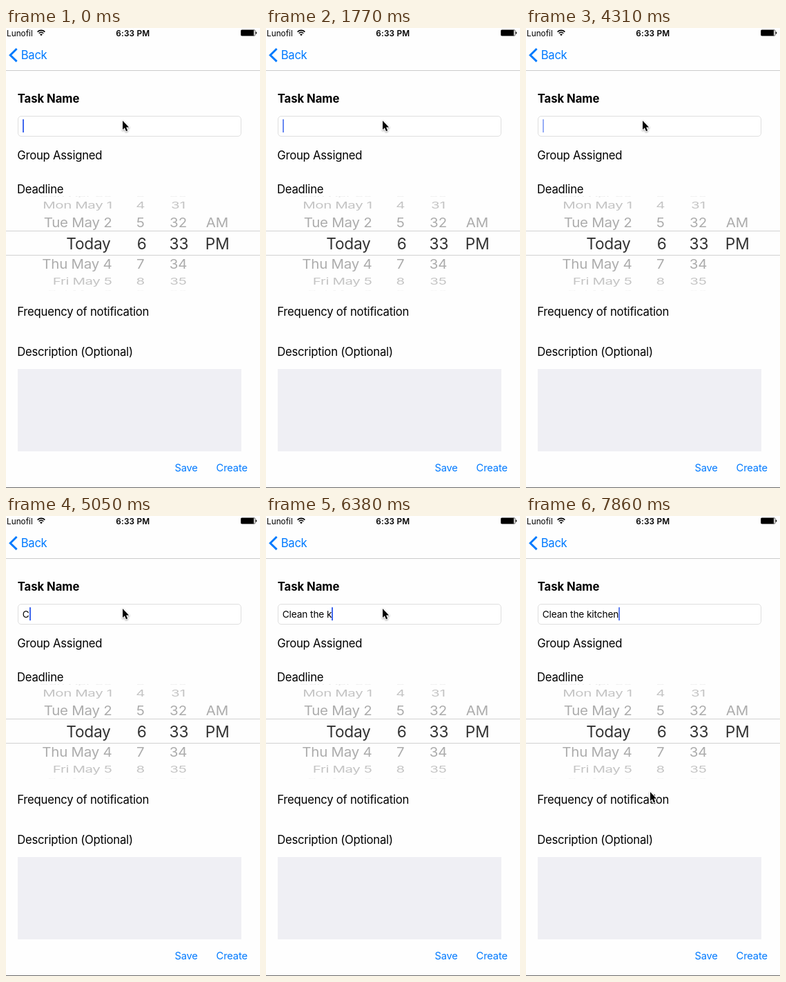
Recreate the animation shown at these times as an HTML page with a canvas. Size 368 by 665 pixels, loop 8000 ms.

```html
<!DOCTYPE html>
<html lang="en">
<head>
<meta charset="utf-8">
<title>New task</title>
<style>
  html, body { margin: 0; width: 100%; height: 100%; overflow: hidden; background: #fefefe; }
  canvas { display: block; width: 368px; height: 665px; }
</style>
</head>
<body>
<canvas id="stage"></canvas>
<script>
const W = 368, H = 665, LOOP = 8000, STEP = 148.2;
const BLUE = '#007aff', CARET = '#4068ee';
const TASK = 'Clean the kitchen';
const canvas = document.getElementById('stage');
const ratio = window.devicePixelRatio || 1;
canvas.width = Math.round(W * ratio);
canvas.height = Math.round(H * ratio);
const ctx = canvas.getContext('2d');

const clamp = v => Math.min(1, Math.max(0, v));
const mix = (a, b, p) => a + (b - a) * p;

// Letters typed at a few steps; the pace between them is even
const pace = [[33, 0], [36, 2.2], [45, 13.2], [46, 13], [50, 17]];

function lettersAt(step) {
  const next = pace.findIndex(([at]) => at > step);
  if (next === 0) return 0;
  if (next < 0) return TASK.length;
  const [from, a] = pace[next - 1], [to, b] = pace[next];
  return Math.round(mix(a, b, (step - from) / (to - from)));
}

// One blink per second, held solid while typing
function caretAlpha(step) {
  const s = step * STEP / 1000;
  const idle = s < 4.97 ? s : Math.max(0, s - 7.6);
  return clamp((Math.abs(idle % 1 - .52) - .14) / .15);
}

// The pointer swings right on its way down
function pointerAt(step) {
  const p = clamp((step - 51) / 2);
  return [mix(169, 180, p) + 52 * Math.sin(Math.PI * p), mix(134, 399, p)];
}

function setFont(size, weight, tracking) {
  ctx.font = `${weight} ${size}px Inter, sans-serif`;
  ctx.letterSpacing = tracking + 'px';
}

function text(str, x, y, { size = 16.7, weight = 400, tracking = -.24, color = '#000',
                           align = 'left', squash = 1 } = {}) {
  ctx.save();
  setFont(size, weight, tracking);
  ctx.fillStyle = color;
  ctx.textAlign = align;
  ctx.translate(x, y);
  ctx.scale(1, squash);
  ctx.fillText(str, 0, 0);
  ctx.restore();
}

function rect(x, y, w, h, color) {
  ctx.fillStyle = color;
  ctx.fillRect(x, y, w, h);
}

function statusBar() {
  text('Lunofil', 1, 11.5, { size: 11.8, tracking: 0 });
  text('6:33 PM', 183.8, 11.5, { size: 11.8, weight: 600, tracking: .2, align: 'center' });

  ctx.strokeStyle = ctx.fillStyle = '#000';
  ctx.lineWidth = 1.6;
  for (const r of [4.6, 7.6]) {
    ctx.beginPath();
    ctx.arc(51, 11, r, -Math.PI * .75, -Math.PI * .25);
    ctx.stroke();
  }
  ctx.beginPath();
  ctx.moveTo(51, 11.3);
  ctx.arc(51, 11.3, 2.7, -Math.PI * .75, -Math.PI * .25);
  ctx.fill();

  ctx.lineWidth = .7;
  ctx.beginPath();
  ctx.roundRect(340.5, 2.8, 20.4, 8.4, 1.4);
  ctx.stroke();
  rect(340.6, 3, 18.4, 8, '#000');
  ctx.beginPath();
  ctx.roundRect(361.8, 5.4, 1.4, 3.2, .7);
  ctx.fill();
}

function navBar() {
  ctx.strokeStyle = BLUE;
  ctx.lineWidth = 2.9;
  ctx.beginPath();
  ctx.moveTo(15.6, 30);
  ctx.lineTo(6.2, 39.2);
  ctx.lineTo(15.6, 48.4);
  ctx.stroke();
  text('Back', 21.7, 45.2, { color: BLUE, tracking: -.3 });
  rect(0, 61, W, 1, '#cbcbcb');
}

function labels() {
  text('Task Name', 16.7, 107.8, { weight: 700, tracking: -.05 });
  text('Group Assigned', 16.2, 189.8);
  text('Deadline', 16, 238.8);
  text('Frequency of notification', 16.2, 415.8);
  text('Description (Optional)', 16.2, 473.8);
  rect(17, 493, 324, 119, '#efeff4');
  text('Save', 244.5, 641, { size: 14.7, color: BLUE });
  text('Create', 304.6, 641, { size: 14.7, color: BLUE, tracking: -.15 });
  rect(0, 664, W, 1, '#6a6a6a');
}

function dayName(offset) {
  if (!offset) return 'Today';
  const parts = { weekday: 'short', month: 'short', day: 'numeric' };
  return new Date(2017, 4, 3 + offset).toLocaleDateString('en-US', parts).replace(',', '');
}

// Rows sit on a cylinder, 25 degrees apart
function pickerRow(i) {
  const angle = i * 25 * Math.PI / 180;
  const squash = Math.cos(angle);
  const size = i ? 20.5 : 22.7;
  const y = 311.3 + 72 * Math.sin(angle) + size * .364 * squash;
  const grey = 255 - 92 * squash;
  const color = i ? `rgb(${grey}, ${grey}, ${grey})` : '#333';
  const style = { size, squash, color, tracking: 0, align: 'center' };
  const lean = i ? 0 : 1;
  text(dayName(i), 153.6 - lean * 2, y,
    { ...style, align: 'right', tracking: -.25 - .15 * (Math.abs(i) > 1) });
  text(6 + i, 194.8 + lean * 2, y, style);
  text(33 + i, 249.6 + lean, y, style);
  if (i === -1) text('AM', 306, y, style);
  if (i === 0) text('PM', 306.3, y, style);
}

function picker() {
  ctx.save();
  ctx.beginPath();
  ctx.rect(0, 243, W, 136.5);
  ctx.clip();
  for (let i = -3; i <= 3; i++) pickerRow(i);
  ctx.restore();
  for (const y of [293, 328]) rect(0, y, W, 1, '#d2d2d2');
}

function field(step) {
  ctx.beginPath();
  ctx.roundRect(17.5, 127.5, 323, 29, 4.5);
  ctx.fillStyle = '#fff';
  ctx.fill();
  ctx.strokeStyle = '#dfdfdf';
  ctx.lineWidth = 1;
  ctx.stroke();

  const size = 13.7, tracking = -.12, left = 23.7;
  const entry = TASK.slice(0, lettersAt(step));
  text(entry, left, 146.8, { size, tracking });
  setFont(size, 400, tracking);
  const end = Math.round(left + ctx.measureText(entry).width);
  ctx.globalAlpha = caretAlpha(step);
  rect(end, 132, 2, 19, CARET);
  ctx.globalAlpha = 1;
}

function arrow([x, y]) {
  ctx.save();
  ctx.translate(x, y);
  ctx.beginPath();
  for (const [px, py] of [[0, 0], [0, 13], [2.9, 10.3], [5, 15.2], [7.2, 14.2], [5.1, 9.4], [9.1, 9.4]])
    ctx.lineTo(px, py);
  ctx.closePath();
  ctx.lineJoin = 'round';
  ctx.lineWidth = 2;
  ctx.strokeStyle = '#fff';
  ctx.shadowColor = 'rgba(0, 0, 0, .4)';
  ctx.shadowBlur = 2.5 * ratio;
  ctx.shadowOffsetY = ratio;
  ctx.stroke();
  ctx.shadowColor = 'transparent';
  ctx.fillStyle = '#000';
  ctx.fill();
  ctx.restore();
}

function draw(now) {
  const step = Math.floor((now % LOOP + 12) / STEP);
  ctx.setTransform(ratio, 0, 0, ratio, 0, 0);
  rect(0, 0, W, H, '#fefefe');
  statusBar();
  navBar();
  labels();
  picker();
  field(step);
  arrow(pointerAt(step));
}

const start = performance.now();
function tick() {
  draw(performance.now() - start);
  requestAnimationFrame(tick);
}
tick();
</script>
</body>
</html>
```
